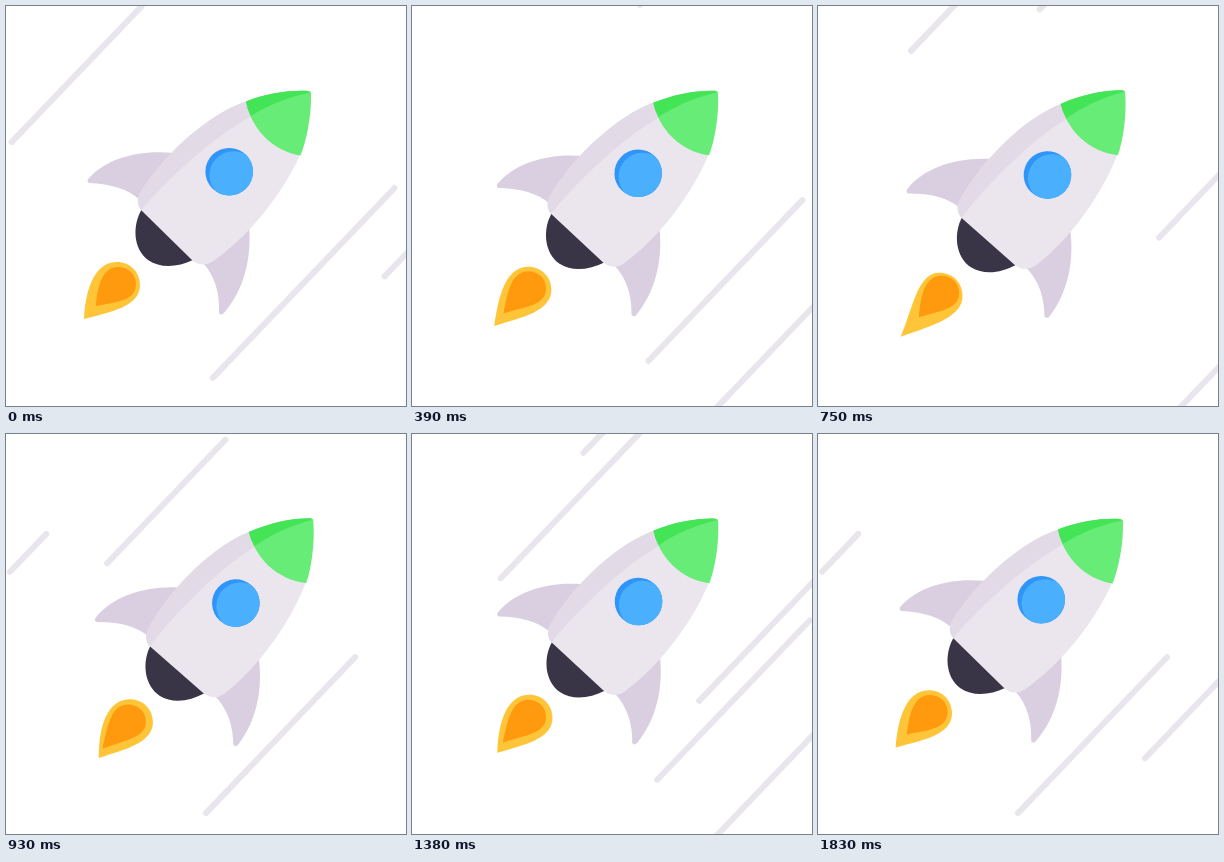
Animation of 400 by 400 pixels, one loop 1860 ms. Source, as an HTML page:

```html
<!DOCTYPE html>
<html lang="en">
<head>
<meta charset="utf-8">
<title>Rocket</title>
<style>
  html, body { margin: 0; width: 100%; height: 100%; overflow: hidden; background: #fff; }
  svg { display: block; width: 100vw; height: 100vh; }
</style>
</head>
<body>
<svg viewBox="0 0 400 400">
  <defs>
    <clipPath id="pane"><circle cx="223.2" cy="165.700" r="23.8"/></clipPath>
  </defs>
  <g id="streaks" stroke="#e9e5ed" stroke-width="6" stroke-linecap="round"></g>
  <g id="rocket">
    <path id="outer" fill="#ffc538"/>
    <path id="inner" fill="#ff9a0f"/>
    <g fill="#d9cfe0">
      <path d="M83 177Q80 175 83 172C100 153 132 143 168 147L150 190L134 194C122 183 105 178 83 177Z"/>
      <path d="M243 220C246 254 237 285 218 307Q215 310 213 307C214 288 209 270 197 257L215 235Z"/>
    </g>
    <path fill="#3a3447" d="M136 203C126 219 127 243 142 254C155 263 172 261 187 254Z"/>
    <path fill="#ebe6ed" d="M303 86C305 110 300 135 294 149C277 187 243 231 206 256Q196 262 186 254L135 204Q129 197 134 187C160 145 205 107 240 95.500C262 87 285 83 303 86Z"/>
    <path fill="#e2dae6" d="M135 204Q129 197 134 187C160 145 205 107 240 95.500L246 110C210 129 165 169 135 204Z"/>
    <path fill="#66ec77" d="M302 85Q305 85 305 88C305.500 110 300.500 135 294.500 149.500C266 145 245 122 240 95.500C262 87 285 84 302 85Z"/>
    <path fill="#43e456" d="M240 95.500C262 87 285 84 302 85L304.500 86.500C282 91 262 99 245 110Q241 103 240 95.500Z"/>
    <circle cx="223.2" cy="165.700" r="23.8" fill="#3095f8"/>
    <circle cx="227.500" cy="169.200" r="24" fill="#4ab0fe" clip-path="url(#pane)"/>
  </g>
</svg>
<script>
const LOOP = 1860, STEP = 30, CYCLE = 1800;
const SLOPE = 1.045, TRAVEL = 220, FLIGHT = 270;

const el = id => document.getElementById(id);
const wave = (t, period) => (1 - Math.cos(2 * Math.PI * t / period)) / 2;

// A streak lies on y = k - SLOPE * x, ends at x = end and sets off at start ms.
function makeStreak(k, end, start, repeat) {
  const line = document.createElementNS("http://www.w3.org/2000/svg", "line");
  el("streaks").append(line);
  return { line, k, end, start, repeat };
}
const twice = (k, end, start) => makeStreak(k, end, start, CYCLE / 2);
const once = (k, end, start) => makeStreak(k, end, start, CYCLE);

const streaks = [
  twice(142, 4, 668), twice(237, 10, 389),
  twice(567, 182, 411), twice(575, 151, 84), twice(588, 197, 708),
  twice(720, 246, 260), twice(780, 270, 600),
  once(198, -10, 1360), once(235, 100, 693),
  once(602, 233, 171), once(602, 242, 1160), once(666, 186, 1786)
];

// The head eases out; the tail hangs back, then catches up.
function drawStreak({ line, k, end, start, repeat }, t) {
  const s = (t - start + repeat) % repeat / FLIGHT;
  const shown = s > 0 && s < 1;
  line.style.display = shown ? "" : "none";
  if (!shown) return;
  const put = (n, x) => {
    line.setAttribute("x" + n, x);
    line.setAttribute("y" + n, k - SLOPE * x);
  };
  put(1, end + TRAVEL * (1 - s ** 6));
  put(2, end + TRAVEL * (1 - s) ** 2.5);
}

function drawFlame(t) {
  const s = wave(t, LOOP / 4);
  const outerTip = `${78 - 9 * s} ${313 + 5.5 * s}`;
  el("outer").setAttribute("d",
    `M${outerTip}C${79 + 5 * s} 292 ${85 + 5 * s} 256 111 256C124 256 134 266 134 279C134 301 104 ${306 + 2 * s} ${outerTip}Z`);
  el("outer").setAttribute("transform", `translate(${-2 * s} ${2.2 * s})`);

  // The core stretches while the outer flame is short.
  const d = 9 * (1 - 0.75 * s) * wave(t, LOOP) ** 0.3;
  const innerTip = `${90 - 0.55 * d} ${300 + 0.45 * d}`;
  el("inner").setAttribute("d",
    `M${innerTip}C91 284 95 261 112 261C122 261 130 268 130 278C130 296 108 296 ${innerTip}Z`);
  el("inner").setAttribute("transform", `translate(${-0.33 * d} 0)`);
}

function draw(now) {
  const t = Math.floor(now % LOOP / STEP) * STEP;
  el("rocket").setAttribute("transform", `rotate(${-3.1 * wave(t, CYCLE) ** 0.85} 290 44)`);
  drawFlame(t);
  streaks.forEach(streak => drawStreak(streak, t));
}

const begin = performance.now();
function tick() {
  draw(performance.now() - begin);
  requestAnimationFrame(tick);
}
tick();
</script>
</body>
</html>
```
